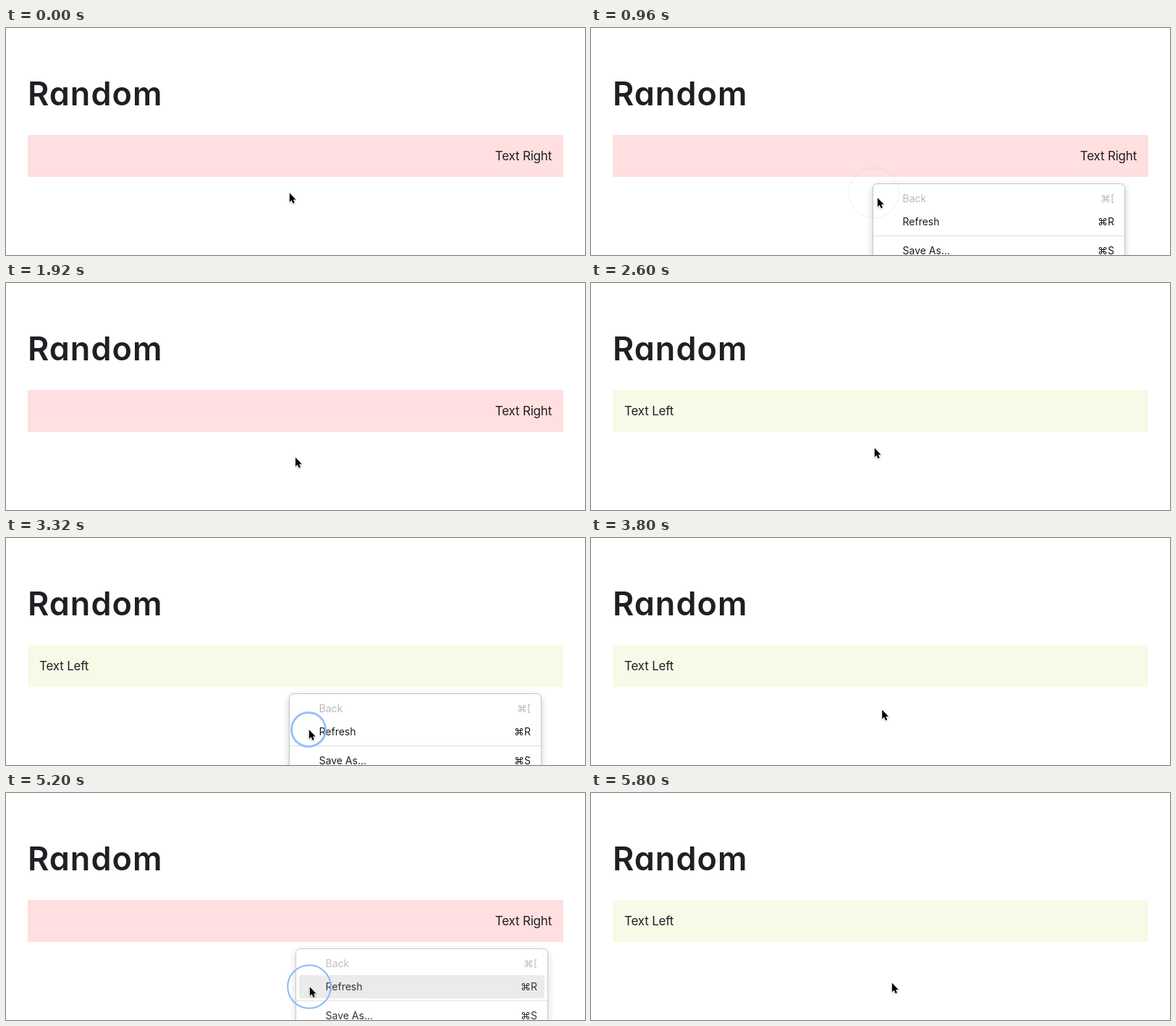
An HTML page that plays this animation: 800 by 314 pixels, repeating every 5840 ms.

```html
<!DOCTYPE html>
<html lang="en">
<head>
<meta charset="utf-8">
<title>Random</title>
<style>
  html, body { margin: 0; width: 100%; height: 100%; overflow: hidden; background: #fff; }
  svg { display: block; width: 100vw; height: 100vh; font-family: Inter, "Open Sans", sans-serif; }
  .title { font-size: 45px; font-weight: 600; letter-spacing: 1px; font-feature-settings: "cv11"; }
  .label { font-size: 17px; letter-spacing: -.2px; }
  .page { fill: #1f1f24; }
  .menu { font-size: 14px; fill: #1c1c1c; }
  .menu .off { fill: #b9b9b9; }
  .keys { text-anchor: end; }
  .panel { filter: drop-shadow(0 3px 5px rgba(0, 0, 0, .2)); }
  .arrow { filter: drop-shadow(0 1px 1px rgba(0, 0, 0, .25)); }
</style>
</head>
<body>
<svg viewBox="0 0 800 314">
  <g class="page">
    <text class="title" x="30" y="106.5">Random</text>
    <rect id="bar" x="30" y="148" width="740" height="58"/>
    <text class="label" id="label" y="183"></text>
  </g>
  <g class="menu" id="menu">
    <rect class="panel" x=".5" y="215.5" width="348" height="140" rx="6.5" fill="#fff" stroke="#c6c6c6"/>
    <rect id="hover" x="5" y="252" width="339" height="32" rx="4" fill="#e9e9e9"/>
    <path d="M1 287.5H348" stroke="#dcdcdc"/>
    <g class="off"><text x="41.5" y="241">Back</text><text class="keys" x="334" y="241">⌘[</text></g>
    <text x="41.5" y="273">Refresh</text><text class="keys" x="334" y="273">⌘R</text>
    <text x="41.5" y="313">Save As...</text><text class="keys" x="334" y="313">⌘S</text>
  </g>
  <circle id="ring" fill="none" stroke="#8cb8f8"/>
  <g id="cursor">
    <path class="arrow" d="M.8 .3V12.8L3.6 10.2L5.6 14.7L7.8 13.8L5.9 9.4H9.6Z"
      stroke="#fff" stroke-width="1.4" stroke-linejoin="round" paint-order="stroke"/>
  </g>
</svg>
<script>
const LOOP = 5840, STEP = 40, RING = 440, GLIDE = 560;

// Each round: right click, menu opens, Refresh is picked, cursor leaves, page reloads.
const rounds = [
  { press: 560, open: 800, pick: 1440, leave: 1680, load: 2020, from: [391, 228], to: [416, 268], menu: 389 },
  { press: 2600, open: 2800, pick: 3160, leave: 3400, load: 3840, from: [391, 228], to: [418, 265], menu: 391 },
  { press: 4360, open: 4560, pick: 4920, leave: 5760, load: 5480, from: [400, 235], to: [419, 268], menu: 400 }
];

const $ = id => document.getElementById(id);
const part = (t, a, b) => Math.min(1, Math.max(0, (t - a) / (b - a)));
const smooth = p => p * p * (3 - 2 * p);
const easeOut = p => 1 - (1 - p) ** 2;
const between = (a, b, p) => a.map((v, i) => v + (b[i] - v) * p);

function set(id, attrs) {
  for (const name in attrs) $(id).setAttribute(name, attrs[name]);
}

function cursorAt(t) {
  let pos = rounds[0].from;
  rounds.forEach((r, i) => {
    const next = rounds[(i + 1) % rounds.length];
    if (t >= r.open) pos = between(r.from, r.to, smooth(part(t, r.open + 20, r.pick - 80)));
    if (t >= r.leave) pos = between(r.to, next.from, easeOut(part(t, r.leave, r.leave + GLIDE)));
  });
  return pos;
}

function drawPage(t) {
  const left = rounds.filter(r => t >= r.load).length % 2 === 1;
  set("bar", { fill: left ? "#f7fae6" : "#ffdfdf" });
  set("label", { x: left ? 46 : 754, "text-anchor": left ? "start" : "end" });
  $("label").textContent = left ? "Text Left" : "Text Right";
}

function drawMenu(t, y) {
  const r = rounds.find(r => t >= r.open && t < r.pick + RING);
  set("menu", { visibility: r ? "visible" : "hidden" });
  if (!r) return;
  const age = t - r.pick;
  const blink = age >= 120 && age < 200;
  set("menu", { transform: `translate(${r.menu} 0)`, opacity: 1 - part(age, 260, RING) });
  set("hover", { opacity: y >= 252 && !blink ? 1 : 0 });
}

function drawRing(t) {
  const start = rounds.flatMap(r => [r.press, r.pick]).find(c => t >= c && t < c + RING);
  if (start === undefined) return set("ring", { opacity: 0 });
  const p = (t - start) / RING;
  const [cx, cy] = cursorAt(start);
  set("ring", {
    cx, cy,
    r: 36 * p ** .42,
    "stroke-width": 3.4 * (1 - p * p),
    opacity: Math.min(1, 2.4 * p, 4 * (1 - p))
  });
}

function draw(now) {
  const t = Math.floor(now % LOOP / STEP) * STEP;
  const [x, y] = cursorAt(t);
  drawPage(t);
  drawMenu(t, y);
  drawRing(t);
  set("cursor", { transform: `translate(${x} ${y})` });
}

const begin = performance.now();
function tick() {
  draw(performance.now() - begin);
  requestAnimationFrame(tick);
}
tick();
</script>
</body>
</html>
```
